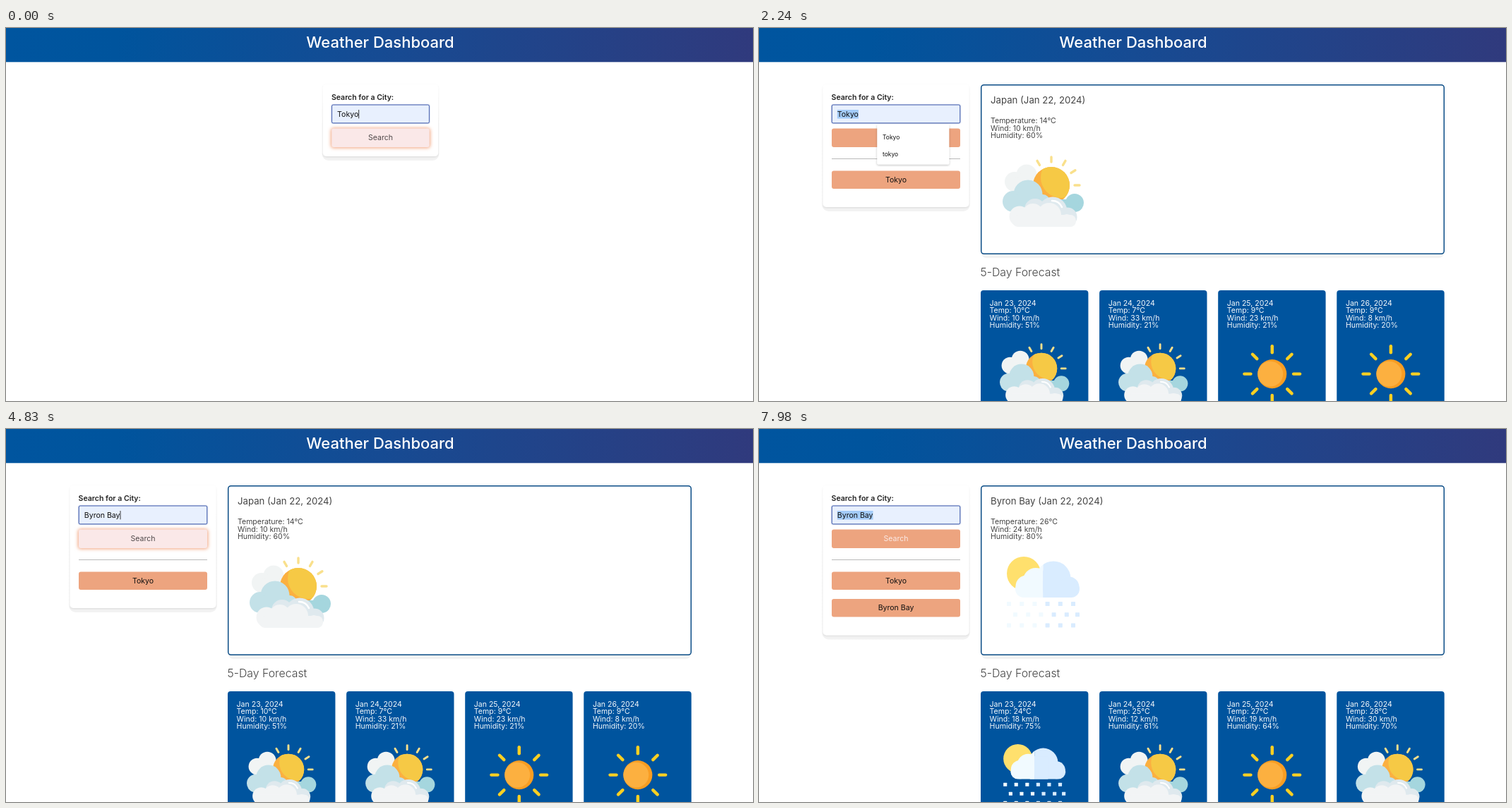
An HTML page that plays this animation: 1058x529 px, repeating every 8 s.

```html
<!DOCTYPE html>
<html lang="en">
<head>
<meta charset="utf-8">
<title>Weather Dashboard</title>
<style>
html, body { margin: 0; width: 100%; height: 100%; overflow: hidden; background: #fff; }
svg { display: block; width: 100vw; height: 100vh; font-family: Inter, "Open Sans", sans-serif; }
</style>
</head>
<body>
<svg viewBox="0 0 1058 529" xmlns="http://www.w3.org/2000/svg">
  <defs>
    <linearGradient id="bar">
      <stop offset="0" stop-color="#00559f"/>
      <stop offset=".15" stop-color="#00549d"/>
      <stop offset=".5" stop-color="#164b93"/>
      <stop offset="1" stop-color="#303a7d"/>
    </linearGradient>
    <linearGradient id="fade" x2="0" y2="1">
      <stop offset="0" stop-color="#f2f2f2" stop-opacity="0"/>
      <stop offset=".5" stop-color="#f2f2f2"/>
    </linearGradient>
    <filter id="soft" x="-10%" y="-30%" width="120%" height="160%">
      <feDropShadow dx="0" dy="1" stdDeviation="1" flood-color="#000" flood-opacity=".1"/>
    </filter>
    <filter id="lift" x="-20%" y="-20%" width="140%" height="150%">
      <feDropShadow dx="0" dy="1" stdDeviation="1.6" flood-color="#000" flood-opacity=".28"/>
    </filter>
    <filter id="glow" x="-10%" y="-50%" width="120%" height="200%">
      <feGaussianBlur stdDeviation="2.6"/>
    </filter>
    <clipPath id="sunClip"><circle cx="69" cy="42" r="26"/></clipPath>
    <clipPath id="left"><rect width="57.5" height="120"/></clipPath>
    <clipPath id="right"><rect x="57.5" width="70" height="120"/></clipPath>
    <g id="cloudy"></g>
    <g id="rain"></g>
    <g id="sun"></g>
  </defs>
  <g id="view"></g>
</svg>
<script>
const ORANGE = '#eda47f', BLUE = '#00549e', INK = '#444';
const byId = id => document.getElementById(id);

const rect = (x, y, w, h, fill, r = 0, extra = '') =>
  `<rect x="${x}" y="${y}" width="${w}" height="${h}" rx="${r}" fill="${fill}" ${extra}/>`;
const circle = (x, y, r, fill, extra = '') =>
  `<circle cx="${x}" cy="${y}" r="${r}" fill="${fill}" ${extra}/>`;
const text = (x, y, value, size = 10.56, fill = INK, extra = '') =>
  `<text x="${x}" y="${y}" font-size="${size}" fill="${fill}" ${extra}>${value}</text>`;
const centered = (x, y, value, fill) => text(x, y, value, 10.56, fill, 'text-anchor="middle"');

function rays(cx, cy, inner, outer, angles, color, width) {
  return angles.map(a => {
    const c = Math.cos(a * Math.PI / 180), s = Math.sin(a * Math.PI / 180);
    return `<line x1="${cx + inner * c}" y1="${cy + inner * s}" x2="${cx + outer * c}" y2="${cy + outer * s}"
      stroke="${color}" stroke-width="${width}" stroke-linecap="round"/>`;
  }).join('');
}

// Icons share one local box, about 115 units wide and 101 high.
byId('cloudy').innerHTML =
  rays(69, 42, 33, 40, [-120, -90, -60, -32, 0], '#f9e08c', 3.4) +
  circle(34, 27, 14.5, '#f1f4f4') + circle(17, 37, 14, '#f1f4f4') + rect(15, 30, 40, 25, '#f1f4f4', 8) +
  circle(69, 42, 26, '#fbb040') +
  circle(83, 31, 29, '#f6c945', 'clip-path="url(#sunClip)"') +
  circle(102, 67, 13, '#a5d6de') + rect(70, 62, 38, 18, '#a5d6de', 8) +
  circle(36, 55, 20.5, '#c3e1e8') + circle(15, 65, 15, '#c3e1e8') + rect(12, 55, 55, 25, '#c3e1e8', 10) +
  circle(71, 79, 20.5, '#dfe9ee') + circle(92, 87, 13.5, '#dfe9ee') +
  circle(46, 76, 15, '#dfe9ee') +
  circle(24, 86, 14.5, '#f2f4f5') + circle(43, 83, 15, '#f2f4f5') +
  circle(66, 84, 17, '#f2f4f5') + circle(91, 92, 9, '#f2f4f5') +
  rect(14, 84, 90, 17, '#f2f4f5', 8) +
  '<path d="M70 64q10 0 14 9" fill="none" stroke="#fff" stroke-width="2.5" stroke-linecap="round"/>';

byId('sun').innerHTML =
  rays(58, 51, 35.5, 46, [0, 45, 90, 135, 180, 225, 270, 315], '#ffd022', 5.2) +
  circle(58, 51, 24, '#f99d22') + circle(55, 51, 21, '#fcb040');

const rainCloud = (fill, side) => `<g clip-path="url(#${side})">` +
  circle(34, 42, 15.5, fill) + circle(47, 34, 18, fill) + circle(72, 31, 24.5, fill) +
  circle(94, 43, 14.5, fill) + rect(18, 34, 91, 24, fill, 12) + rect(50, 20, 30, 38, fill) + '</g>';
let drops = '';
for (let row = 0; row < 3; row++)
  for (let col = 0; col < 6; col++) {
    const x = Math.min(6 + col * 18.2 + (row % 2 ? 9 : 0), 103);
    drops += rect(x, 64 + row * 15.2, 6, 6, x < 57 ? '#f1faff' : '#d9ecff', .6);
  }
byId('rain').innerHTML = circle(30, 24, 24, '#ffe06d') +
  rainCloud('#f1faff', 'left') + rainCloud('#d9ecff', 'right') + drops;

const tokyo = {
  title: 'Japan (Jan 22, 2024)', now: [14, 10, 60], icon: 'cloudy',
  days: [[10, 10, 51, 'cloudy'], [7, 33, 21, 'cloudy'], [9, 23, 21, 'sun'], [9, 8, 20, 'sun']]
};
const byron = {
  title: 'Byron Bay (Jan 22, 2024)', now: [26, 24, 80], icon: 'rain',
  days: [[24, 18, 75, 'rain'], [25, 12, 61, 'cloudy'], [27, 19, 64, 'sun'], [28, 30, 70, 'cloudy']]
};

// Each step keeps the earlier state and overrides part of it.
const steps = [
  [0, { value: 'Tokyo', filled: true, focus: true, caret: true, button: 'hover', history: [], weather: null, menu: [] }],
  [210, { focus: false, caret: false }],
  [350, { button: 'focus', history: ['Tokyo'] }],
  [1540, { weather: tokyo }],
  [2100, { focus: true, button: 'idle', menu: ['Tokyo', 'tokyo'] }],
  [2240, { selectFrom: 0 }],
  [3430, { value: 'B', filled: false, selectFrom: -1, caret: true }],
  [3500, { menu: ['Byron Bay'] }],
  [3640, { value: 'By' }],
  [3780, { value: 'Byr' }],
  [4200, { beam: true }],
  [4270, { beam: false }],
  [4340, { caret: false }],
  [4550, { value: 'Byron Bay', filled: true, hot: true }],
  [4760, { menu: [], caret: true, button: 'hover' }],
  [5110, { button: 'idle' }],
  [5320, { caret: false }],
  [5460, { button: 'hover' }],
  [5600, { focus: false, button: 'focus' }],
  [5670, { history: ['Tokyo', 'Byron Bay'] }],
  [6930, { weather: byron }],
  [7700, { focus: true, caret: true, button: 'idle' }],
  [7840, { caret: false, selectFrom: 6 }],
  [7980, { selectFrom: 0 }]
];
let last = { selectFrom: -1 };
const states = steps.map(([at, change]) => ({ at, ...(last = { ...last, ...change }) }));

const pen = document.createElement('canvas').getContext('2d');
function widthOf(value) {
  pen.font = '10.56px Inter, "Open Sans", sans-serif';
  return pen.measureText(value).width;
}

function panel(x, y, w, h, fill, extra = '') {
  return rect(x, y + 6, w, h, '#f2f2f2', 8) + rect(x, y, w, h, fill, 4, extra);
}

function searchPanel(s) {
  const wide = s.history.length > 0;
  const x = wide ? 103 : 461.3, w = wide ? 182 : 138.4, mid = x + w / 2;
  const bottom = wide ? 215.5 + 38.5 * s.history.length : 182;
  let out = rect(x - 13.5, 84, w + 27, bottom - 78, 'url(#fade)', 9) +
    rect(x - 12.5, 80, w + 25, bottom - 80, '#fff', 5, 'filter="url(#soft)"') +
    text(x - .4, 101.6, 'Search for a City:', 10.56, '#222', 'font-weight="600"');
  out += searchInput(s, x, w) + searchButton(s.button, x, w, mid);
  if (wide) out += rect(x, 185, w, 1, '#b9b9b9');
  s.history.forEach((city, i) => {
    const y = 202.6 + 38.4 * i;
    out += rect(x, y, w, 25.4, ORANGE, 3) + centered(mid, y + 16.2, city, '#111');
  });
  return out + menu(s);
}

function searchInput(s, x, w) {
  const tx = x + 7.8;
  let out = '';
  if (s.focus) out += rect(x - 1, 107.9, w + 2, 28, '#c5cfe8', 3);
  out += rect(x + .3, 109, w - .6, 25.8, s.filled ? '#e8f0fe' : '#fff', 2,
    `stroke="${s.focus ? '#4c65b0' : '#b4bccb'}" stroke-width="1"`);
  if (s.selectFrom >= 0) {
    const start = widthOf(s.value.slice(0, s.selectFrom));
    out += rect(tx + start, 116, widthOf(s.value) - start, 12.5, '#a3cbf8');
  }
  out += text(tx, 125.8, s.value, 10.56, s.filled ? '#111' : '#555');
  if (s.caret) out += rect(tx + widthOf(s.value), 116, .9, 12.3, '#222');
  if (s.beam) out += '<path d="M233 119.5q2 0 2 1.5v7q0 1.5-2 1.5m4-10q-2 0-2 1.5m0 7q0 1.5 2 1.5m-3-4.5h2" fill="none" stroke="#222" stroke-width=".9"/>';
  return out;
}

function searchButton(mode, x, w, mid) {
  let out = '';
  if (mode === 'hover')
    out += rect(x - 1, 142, w + 2, 28, '#f2a27c', 4, 'filter="url(#glow)"');
  if (mode === 'focus')
    out += rect(x - 1.3, 141.2, w + 2.6, 28.8, '#d6d0ce', 4);
  out += rect(x, 142.6, w, 26.4, mode === 'hover' ? '#fae8e8' : ORANGE, 3);
  return out + centered(mid, 159.2, 'Search', mode === 'idle' ? '#faeae6' : '#50494a');
}

function menu(s) {
  if (!s.menu.length) return '';
  let out = rect(167.3, 136.5, 102, 9.5 + 23.7 * s.menu.length, '#fff', 2, 'filter="url(#lift)"');
  if (s.hot) out += rect(167.3, 143.5, 102, 23.5, '#e8e8e8');
  s.menu.forEach((city, i) => out += text(175, 158.2 + 23.6 * i, city, 8.5, '#111'));
  return out;
}

const readings = (x, y, gap, rows, fill) =>
  rows.map((row, i) => text(x, y + i * gap, row, 10.56, fill)).join('');

function forecast(data) {
  const shift = data ? 186 : 0;
  let out = panel(314.7, 80.7, 655.6, 53.6 + shift, '#fff', 'stroke="#0a4c86" stroke-width="1.5"') +
    text(313.6, 165.8 + shift, '5-Day Forecast', 15.84, INK, 'font-weight="300"');
  if (data) {
    const [temp, wind, damp] = data.now;
    out += text(328, 106.7, data.title, 13.2) +
      readings(328, 135.2, 10.5, [`Temperature: ${temp}°C`, `Wind: ${wind} km/h`, `Humidity: ${damp}%`], INK) +
      `<use href="#${data.icon}" transform="translate(345 181)"/>`;
  }
  for (let i = 0; i < 4; i++) {
    const x = 314 + i * 168.1;
    out += panel(x, 186 + shift, 152.4, data ? 200 : 36.6, BLUE);
    if (!data) continue;
    const [temp, wind, damp, icon] = data.days[i];
    out += readings(x + 12.6, 393.6, 10.5,
        [`Jan ${23 + i}, 2024`, `Temp: ${temp}°C`, `Wind: ${wind} km/h`, `Humidity: ${damp}%`], '#f4f7fb') +
      `<use href="#${icon}" transform="translate(${x + 27} 447) scale(.855)"/>`;
  }
  return out;
}

function draw(s) {
  byId('view').innerHTML = rect(0, 0, 1058, 529, '#fff') + rect(0, 0, 1058, 48.3, 'url(#bar)') +
    text(530, 28.4, 'Weather Dashboard', 22, '#fff', 'font-weight="500" text-anchor="middle"') +
    (s.history.length ? forecast(s.weather) : '') + searchPanel(s);
}

let shown = null;
const begin = performance.now();
function tick() {
  const t = (performance.now() - begin) % 8000;
  const state = states.findLast(s => s.at <= t);
  if (state !== shown) draw(shown = state);
  requestAnimationFrame(tick);
}
tick();
</script>
</body>
</html>
```
